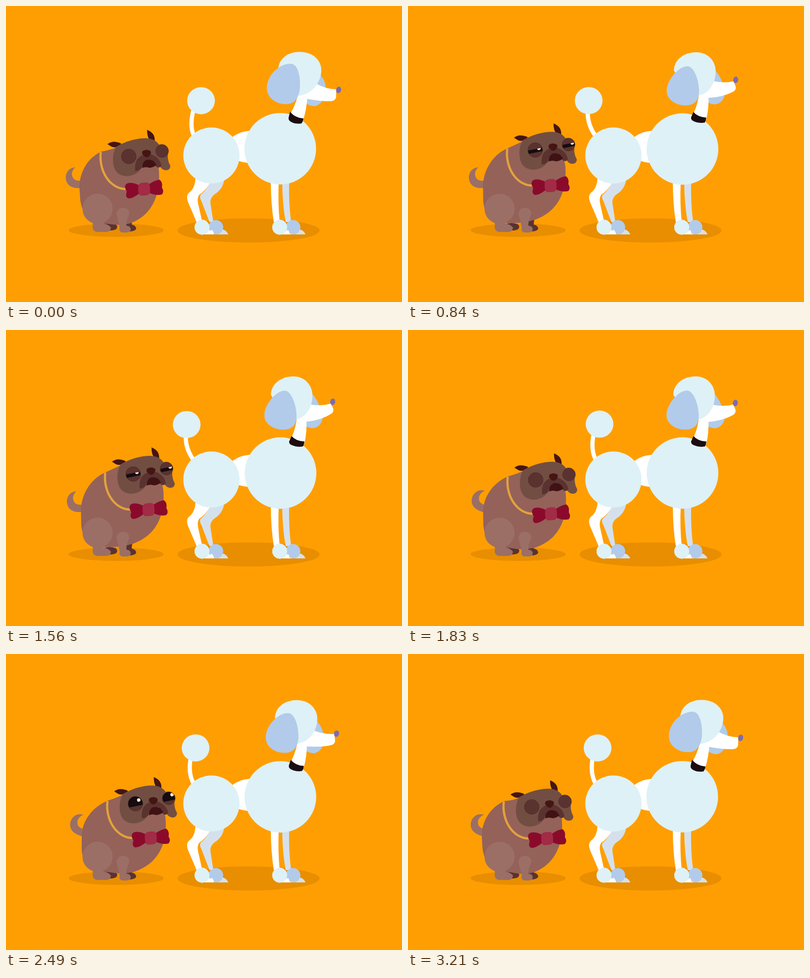
Animation of 800x600 px, one loop 3240 ms. Source, as an HTML page with a canvas:

```html
<!DOCTYPE html>
<html lang="en">
<head>
<meta charset="utf-8">
<title>Two dogs</title>
<style>
html, body { margin: 0; width: 100%; height: 100%; overflow: hidden; background: #ff9e02; }
canvas { display: block; }
</style>
</head>
<body>
<canvas id="stage" width="800" height="600"></canvas>
<script>
const ctx = document.getElementById('stage').getContext('2d');
const LOOP = 3240, STEP = 30;
const BG = '#ff9e02', SHADE = '#e88e00';
const FLUFF = '#def1f6', WHITE = '#ffffff', BLUE = '#b2cbea', PALE = '#d4e1ed';
const FUR = '#946259', LEG = '#9b6f66', MASK = '#724e42', LID = '#5a3230', DEEP = '#451514';

// Looping track of [time, value] keys, smooth and without overshoot.
function track(...keys) {
  const n = keys.length;
  const at = i => {
    const k = keys[((i % n) + n) % n];
    return [k[0] + Math.floor(i / n) * LOOP, k[1]];
  };
  const rate = i => {
    const [a, b] = [at(i), at(i + 1)];
    return (b[1] - a[1]) / (b[0] - a[0]);
  };
  const slope = i => {
    const a = rate(i - 1), b = rate(i);
    return a * b > 0 ? 2 * a * b / (a + b) : 0;
  };
  return t => {
    let i = n - 1;
    while (at(i)[0] > t) i--;
    const [t0, a] = at(i), [t1, b] = at(i + 1);
    const d = t1 - t0, s = (t - t0) / d, s2 = s * s, s3 = s2 * s;
    return a * (2 * s3 - 3 * s2 + 1) + b * (3 * s2 - 2 * s3)
      + d * (slope(i) * (s3 - 2 * s2 + s) + slope(i + 1) * (s3 - s2));
  };
}

const tilt = track([0, 0], [330, .1], [540, .48], [840, .86], [1200, .97], [1560, 1],
  [2100, .84], [2490, .45], [2700, .23], [3210, 0]);
const snout = track([0, 0], [330, -.04], [540, .45], [840, .83], [1200, .95], [1560, 1],
  [2100, .7], [2490, .35], [2700, .17], [3210, 0]);
const headX = track([0, -9], [330, -6], [600, -2], [840, 0], [1560, 0], [2100, 2.5],
  [2490, 4.5], [2700, 3], [3000, -4], [3210, -7]);
const headY = track([0, 13], [120, 4], [270, 0], [1560, 0], [1800, 10], [2010, 25],
  [2100, 26], [2190, 25], [2490, 11.5], [2640, 6], [2760, 12], [2910, 24], [3000, 25], [3210, 18]);
const chestY = track([0, 7], [150, 1], [330, 0], [1560, 0], [1800, 7], [2010, 20],
  [2100, 21], [2190, 20], [2490, 9], [2640, 5], [2760, 9], [2910, 18], [3000, 18], [3210, 10]);
const lidY = track([0, 5], [420, 5], [600, -2], [1560, -2], [1700, 5], [2130, 5],
  [2310, -16], [2700, -16], [2850, 5]);

function shape(path, color) {
  ctx.fillStyle = color;
  ctx.fill(new Path2D(path));
}
function line(path, width, color) {
  ctx.lineWidth = width;
  ctx.strokeStyle = color;
  ctx.stroke(new Path2D(path));
}
function oval(x, y, rx, ry, color, turn = 0) {
  ctx.fillStyle = color;
  ctx.beginPath();
  ctx.ellipse(x, y, rx, ry, turn, 0, 7);
  ctx.fill();
}
const disc = (x, y, r, color) => oval(x, y, r, r, color);

// Blends two paths that share the same commands.
function morph(a, b, p) {
  const nums = b.match(/-?[\d.]+/g);
  let i = 0;
  return a.replace(/-?[\d.]+/g, v => +v + (nums[i++] - v) * p);
}
function shifted(x, y, draw) {
  ctx.save();
  ctx.translate(x, y);
  draw();
  ctx.restore();
}

function foot(x, r, ball, toe) {
  shape(`M${x} 463 V452 Q${x + 20} 450 ${x + 25} 463Z`, toe);
  disc(x, 448.5, r, ball);
}

function poodleTail(t) {
  const a = t / 180 * Math.PI * 2;
  const x = 376 + 18 * Math.cos(a) + 2.3 * Math.sin(a), d = x - 365;
  const y = 190.3 + (x - 379) ** 2 / 140;
  line(`M381 266 Q${364 + d * .2} 245 ${363 + d * .53} ${218 - d * .2} L${363.5 + d * .6} ${208 - d * .2}`, 8.5, WHITE);
  oval(x, y, 28, 27.5, FLUFF);
}

function poodleHead(p, q) {
  shape(morph(
    'M620 130 Q646 142 646 168 Q643 199 624 203 Q611 203 604 194Z',
    'M612 124 Q632 138 640 178 Q636 197 620 199 Q610 199 602 192Z', p), BLUE);
  shape(morph(
    'M592 170 Q588 194 575 218 L600 232 Q608 208 609 180Z',
    'M588 170 Q587 196 577 218 L603 230 Q608 208 607 180Z', p), WHITE);
  shape(morph(
    'M574 214 Q582 226 601 228 Q600 234 597 238 Q585 240 576 235 Q570 232 571 226Z',
    'M577 215 Q585 225 603 226 Q602 232 600 236 Q588 238 579 234 Q571 231 572 226Z', p), '#1b0c11');
  shape(morph(
    'M592 188 L596 165 L626 157 Q645 168 667 169 L667 184 Q666 193 654 193 Q632 193 607 188Z',
    'M588 188 L592 165 L614 151 Q638 155 656 149 L661 159 Q663 167 655 171 Q636 183 606 186Z', q), WHITE);
  shape(morph(
    'M550 128 C551 106 570 93 593 93 C620 93 637 110 637 130 C637 152 621 178 592 182 L565 165Z',
    'M535 131 C536 108 557 94 580 94 C604 94 619 112 619 133 C619 155 608 177 585 182 L555 165Z', p), FLUFF);
  shape(morph(
    'M594 160 C594 137 588 117 575 117 C550 117 527 142 527 166 C527 186 545 199 566 199 C585 199 594 182 594 160Z',
    'M587 172 C586 148 575 123 563 123 C545 123 522 152 522 173 C522 190 540 202 560 202 C578 202 588 192 587 172Z', p), BLUE);
  oval(672 - 12 * q, 170 - 24.5 * q, 5, 6.6, '#7a6cb4', .25 - .1 * q);
}

function poodle(t) {
  const p = tilt(t);
  oval(490, 455, 143.5, 24.5, SHADE);
  poodleTail(t);
  foot(424, 14.5, BLUE, PALE);
  foot(580, 14.5, BLUE, PALE);
  shape('M408 352 L441 350 Q439 371 421 382 Q412 389 413 400 L419 438 L411 438 L395 396 Q390 387 393 383 Q405 373 413 356Z', PALE);
  shape('M558 355 Q558 400 565 438 H576 Q571 402 572 355Z', PALE);
  foot(396, 15, FLUFF, WHITE);
  foot(553, 15, FLUFF, WHITE);
  shape('M383 345 Q383 369 369 379 Q363 386 368 398 L385 438 L396 436 L388 400 Q386 390 390 383 Q405 373 414 355Z', WHITE);
  shape('M535 355 Q535 400 541 438 H553 Q549 402 551 355Z', WHITE);
  disc(396, 448.5, 15, FLUFF);
  disc(553, 448.5, 15, FLUFF);
  disc(424, 448.5, 14.5, BLUE);
  disc(580, 448.5, 14.5, BLUE);
  shape('M408 463 Q412 453 416 454 Q420 458 420 463Z', WHITE);
  shape('M565 463 Q568 453 570 454 Q573 458 573 463Z', WHITE);
  disc(396, 448.5, 15, FLUFF);
  disc(553, 448.5, 15, FLUFF);
  shape('M452 270 Q468 255 492 253 V318 Q478 318 462 311Z', WHITE);
  disc(415, 303, 56.8, FLUFF);
  disc(554 + .6 * p, 289.3 + .7 * p, 72.4, FLUFF);
  poodleHead(p, snout(t));
}

function eye(x, y, r, top) {
  disc(x, y, r, LID);
  if (top < 4.5) {
    ctx.save();
    ctx.beginPath();
    ctx.arc(x, y, r, 0, 7);
    ctx.clip();
    ctx.translate(x, y);
    ctx.rotate(-.2);
    ctx.beginPath();
    ctx.rect(-20, top, 40, 5 - top);
    ctx.clip();
    disc(0, 0, r, '#140c0e');
    oval(8, top < -6 ? -6 : -2, 3.5, 3.5, '#fbe6cf');
    ctx.restore();
  }
  ctx.lineWidth = .7;
  ctx.strokeStyle = '#4c2828';
  ctx.beginPath();
  ctx.arc(x, y, r, 0, 7);
  ctx.stroke();
}

function pugHead(lid) {
  shape('M214 267 Q225 258 242 266 Q234 277 222 272Z', DEEP);
  shape('M294 238 Q312 245 309 263 Q294 262 294 238Z', DEEP);
  shape('M232 272 Q262 255 292 255 Q310 256 318 268 Q333 264 337 280 Q333 297 341 311 Q341 320 331 320 Q323 319 318 309 L300 312 L282 316 Q273 331 252 332 Q226 330 225 300 Q225 282 232 272Z', MASK);
  eye(257, 292, 15, lid);
  eye(324.3, 281, 13, lid);
  shape('M270 321 Q268 300 280 292 Q292 284 306 289 Q321 297 323 311 Q317 318 311 311 L304 299 L292 299 Q285 305 282 316 Q276 322 270 321Z', LID);
  shape('M284 315 Q284 304 292 299 Q302 297 308 302 L313 309 Q308 314 299 315 Q291 312 284 315Z', '#411214');
  shape('M285 281 Q293 276 301 281 Q304 287 296 293 Q291 295 287 290 Q282 286 285 281Z', DEEP);
}

function bow() {
  shape('M253 353 Q262 349 277 356 L278 373 Q266 383 256 383 Q249 380 253 369 Q246 358 253 353Z', '#8b0a2c');
  shape('M298 354 Q310 346 319 345 Q326 350 324 361 Q329 369 324 375 Q313 378 299 372Z', '#8b0a2c');
  shape('M281 352 Q288 350 295 351 Q300 353 300 363 Q301 374 296 376 Q288 378 280 377 Q276 374 276 364 Q275 354 281 352Z', '#a22b45');
}

function pugTail(t, x) {
  ctx.save();
  ctx.translate(152 + .25 * x, 362);
  ctx.rotate(.36 * (1 - Math.cos(t / 120 * Math.PI * 2)));
  ctx.translate(-152, -362);
  shape('M164 369 L150 369 C130 370 122 358 123 345 C125 334 131 328 142 327 C135 334 134 341 137 347 C140 354 146 355 164 354Z', LEG);
  ctx.restore();
}

function pugBody(x, y, hx, hy) {
  shape(`M${151.5 + .35 * x} ${367 + .3 * y}
    C${151 + .35 * x} ${338 + .5 * y} ${168 + .7 * x} ${302 + y} ${202 + x} ${288 + y}
    Q${222 + hx} ${279 + hy} ${245 + hx} ${268 + hy}
    L${310 + hx} ${290 + hy} L${317.5 + x} ${322 + y}
    C${322 + x} ${366 + y} ${310 + x} ${414 + y} ${257 + x * .4} ${433 + y * .95}
    Q${232} ${441 + y * .75} 206 ${440 + y * .2}
    Q180 441 166 430 Q154 418 ${152 + .2 * x} 395Z`, FUR);
}

function pug(t) {
  const hx = headX(t), hy = headY(t), y = chestY(t);
  oval(222.5, 454.5, 96, 13.5, SHADE);
  pugTail(t, hx);
  shape('M196 442 Q210 438 221 442 Q227 446 223 452 Q216 456 203 455Z', LID);
  shape('M243 420 L258 422 Q254 436 254 443 Q263 445 263 452 Q260 457 248 457 L240 442Z', LID);
  pugBody(hx, y, hx, hy);
  disc(185, 411, 30.5, LEG);
  shape('M172 432 Q177 438 175 449 Q176 457 184 458 L204 458 Q212 456 212 449 Q206 442 197 441 L190 430Z', LEG);
  shape('M223 422 Q225 409 237 409 Q249 410 249 422 Q243 434 243 445 Q252 446 252 453 Q251 458 245 459 L234 459 Q227 456 230 450 Q226 432 223 422Z', LEG);
  shifted(hx, y, () => line('M200.5 289 C196 325 217 366 256 364', 4.5, '#e3a23c'));
  shifted(hx, hy, () => pugHead(lidY(t)));
  shifted(hx, y, bow);
}

function frame() {
  const t = Math.floor(performance.now() % LOOP / STEP) * STEP;
  ctx.fillStyle = BG;
  ctx.fillRect(0, 0, 800, 600);
  pug(t);
  poodle(t);
  requestAnimationFrame(frame);
}
frame();
</script>
</body>
</html>
```
